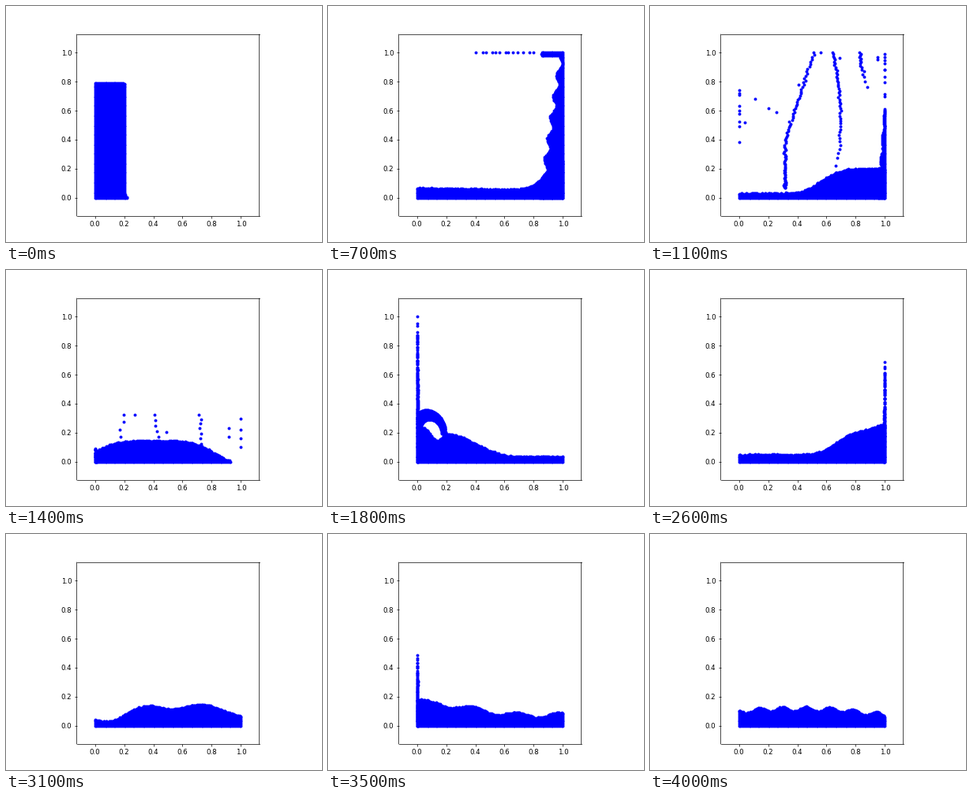
A matplotlib script that plays this animation: 400 by 300 pixels, repeating every 4.1 s.

```python
import numpy as np
import matplotlib.pyplot as plt
from matplotlib.animation import FuncAnimation

FRAMES, STEP = 41, 100
GAP = 0.01
GRID = np.linspace(0, 1, 101)
VOLUME = 0.104

# Run-up on the side walls: wall x, peak time, half duration, height, thickness.
JETS = [
    (1, 800, 450, 1.1, .15),
    (0, 1800, 420, .9, .01),
    (1, 2620, 400, .62, .01),
    (0, 3450, 300, .45, .01),
]
# Strands torn off the ceiling: lowest y, number of drops, bias, x as a function of y.
STRANDS = [
    (.07, 85, 1.5, lambda y: .315 + .33 * np.clip(y - .4, 0, 1)),
    (.22, 46, .7, lambda y: .65 + .045 * np.sin(np.pi * (y - .15) / .8)),
    (.80, 15, .7, lambda y: .83 + .9 * (1 - y) ** 2),
]
LOOSE = [(.41, .78), (.56, 1), (.69, .96), (.88, .76), (.95, .97), (.95, .95)]


def ramp(t, start, end):
    s = np.clip((t - start) / (end - start), 0, 1)
    return s * s * (3 - 2 * s)


def bump(x, center, width, power=2):
    return np.exp(-np.abs((x - center) / width) ** power)


def collapse(x, t):
    """The column slumps to a wedge; its length follows from its volume."""
    height = .066 + .724 * np.cos(np.pi / 2 * t / 700) ** 3
    p = 1 + 300 * np.exp(-t / 20)
    length = .16 * (p + 1) / (p * height)
    h = height * (1 - (x / length) ** p)
    toe = np.minimum(.03, 1.5 * (length + .02 - x))
    return np.maximum(h, toe) + .2 * ramp(t, 300, 700) * bump(x, 1, .15)


def slosh(x, t):
    """One hump swings between the walls while the volume stays the same."""
    center = .5 + .55 * np.cos(2 * np.pi * (t - 900) / 1800)
    hump = bump(x, center, .5 - .12 * center, 4)
    amp = .17 * min(1, np.exp((2600 - t) / 1000))
    h = VOLUME + amp * (hump - hump.mean())
    late = (t - 3100) / 900
    ripple = np.cos(2 * np.pi * (x - .33 - .13 * late) / (.4 - .24 * late))
    h += .015 * ramp(t, 2600, 3100) * ripple
    h -= .06 * max(0, 1 - abs(t - 1800) / 200) * bump(x, .135, .045)
    for wall, peak, half, *_ in JETS[1:]:
        h += .04 * max(0, 1 - ((t - peak) / half) ** 2) * bump(x, wall, .08)
    return h


def surface(x, t):
    k = ramp(t, 700, 1000)
    return (1 - k) * collapse(x, min(t, 700)) + k * slosh(x, max(t, 700))


def fill(heights, rough, rng):
    """Particles between the base line and each height; negative means empty."""
    out = [np.empty((0, 2))]
    for a, h in zip(GRID, heights):
        if h >= 0:
            top = max(0, h + rough * rng.uniform(-1, 1))
            b = np.r_[np.arange(0, top, GAP), top]
            out.append(np.column_stack([np.full(len(b), a), b]))
    return np.vstack(out)


def jet(t, wall, peak, half, height, thick, rng):
    top = height * (1 - ((t - peak) / half) ** 2)
    if top <= 0:
        return np.empty((0, 2))
    fade = min(1, (peak + half - t) / (1.2 * half))
    width = thick * (1 - GRID / top)
    broad = thick > .05
    if broad:
        width += .016 * np.cos(2 * np.pi * (GRID - .41) / .145)
        if top > 1:
            width[GRID > .975] += .12
    width = np.where(GRID <= top, np.maximum(width * fade, 0), -1)
    if not broad:
        width[(GRID > .62 * top) & (holes < .22)] = -1
    y, depth = fill(width, .003, rng).T
    points = np.column_stack([np.abs(wall - depth), y])
    if not broad:
        tip = top * np.array([1.04, 1.06, 1.11])
        points = np.vstack([points, np.column_stack([np.full(3, wall), tip])])
    return points


def curl(t):
    """A plunging sheet that wraps over from the left wall."""
    end = np.radians(150 - 150 * (t - 1600) / 200)
    angle = np.linspace(np.radians(150), max(end, np.radians(-40)), 70)
    rel = np.clip(angle / np.radians(150), 0, 1)
    depth = .025 + .065 * rel ** 1.2
    drop = .05 * max(0, t - 1800) / 150
    layers = []
    for k in np.linspace(0, 1, 9):
        r = 1 - k * depth / .145
        layers.append(np.column_stack([.065 + .13 * r * np.cos(angle),
                                       .195 - drop + .16 * r * np.sin(angle)]))
    points = np.vstack(layers)
    return points[points[:, 0] >= 0]


def fall(start, end, t):
    """Drops leave the ceiling at 700 ms and pass their end points at 1100 ms."""
    s = (t - 700) / 400
    x = start + (end[:, 0] - start) * s
    y = 1 - (1 - end[:, 1]) * s ** 2 - 1.2 * max(s - 1, 0) ** 2
    return np.column_stack([np.clip(x, 0, 1), y])[y > 0]


seed = np.random.default_rng(4)
holes = seed.random(len(GRID))

ceiling = np.linspace(.415, .79, 13) + seed.uniform(-.015, .015, 13)
landing = np.column_stack([np.maximum(0, 2 * (ceiling - .67)),
                           seed.uniform(.38, .78, 13)])
ends = [np.array(LOOSE), np.column_stack([np.ones(10), seed.uniform(.68, 1, 10)])]
for low, count, bias, path in STRANDS:
    y = low + (1 - low) * np.linspace(0, 1, count) ** bias
    ends.append(np.column_stack([path(y) + seed.normal(0, .004, count), y]))
ends = np.vstack(ends)
starts = np.where(ends[:, 0] == 1, 1, .87 + .13 * ends[:, 0])


def particles(t):
    rng = np.random.default_rng(t)
    parts = [fill(surface(GRID, t), .004 * min(t / 300, 1), rng)]
    parts += [jet(t, *spec, rng) for spec in JETS]
    if 500 < t <= 700:
        x = 1 - (1 - ceiling) * (t - 500) / 200
        parts.append(np.column_stack([x, np.ones_like(x)]))
    if 700 < t < 1600:
        parts += [fall(ceiling, landing, t), fall(starts, ends, t)]
    if 1600 < t < 2000:
        parts.append(curl(t))
    return np.vstack(parts)


fig, ax = plt.subplots(figsize=(6.4, 4.8), dpi=62.5)
ax.set_aspect("equal")
ticks = np.arange(0, 1.1, .2)
ax.set(xlim=(-.125, 1.125), ylim=(-.125, 1.125), xticks=ticks, yticks=ticks)
for side in ("left", "right"):
    ax.spines[side].set_snap(False)
dots, = ax.plot([], [], "b.", markersize=7)


def update(i):
    dots.set_data(*particles(i * STEP).T)
    return dots,


anim = FuncAnimation(fig, update, frames=FRAMES, interval=STEP, repeat=True,
                     repeat_delay=0)
plt.show()
```
